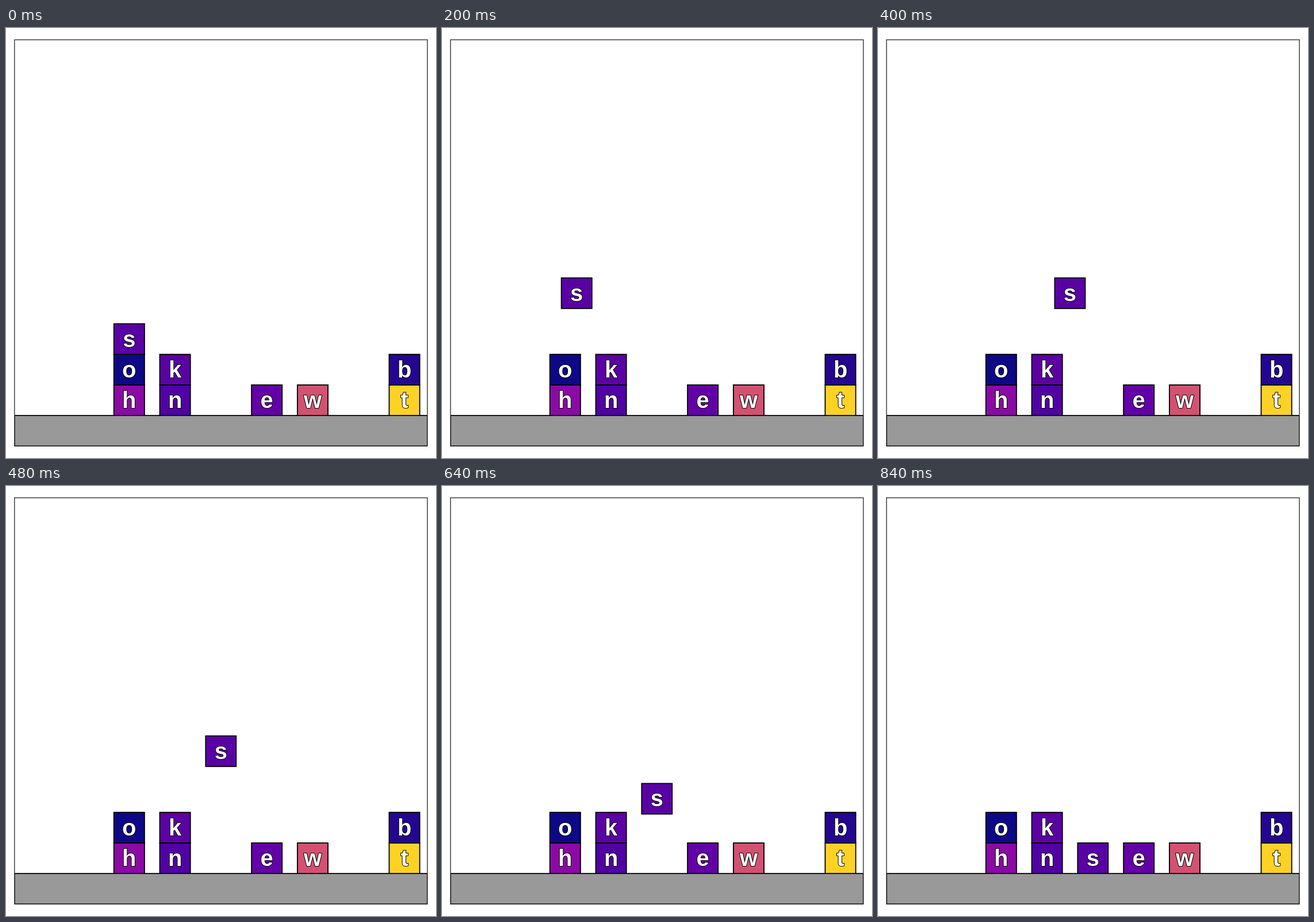
Write an HTML page that moves like this. It is 748 by 748 pixels and loops after 880 ms.

```html
<!DOCTYPE html>
<html lang="en">
<head>
<meta charset="utf-8">
<title>Stacking blocks</title>
<style>
  html, body { margin: 0; width: 100%; height: 100%; overflow: hidden; background: #fff; }
  svg { display: block; width: 748px; height: 748px; }
  .solid { stroke: #000; stroke-width: 1.8; }
  .frame { fill: none; stroke: #333; stroke-width: 1.4; }
  text {
    font: bold 40px "Liberation Sans", Arial, sans-serif;
    text-anchor: middle;
    fill: #fff;
    stroke: #000;
    stroke-width: 2;
    stroke-linejoin: round;
    paint-order: stroke;
  }
  .mover { animation: carry 880ms infinite; }
  /* lift, carry across, lower, rest: one step every 40 ms */
  @keyframes carry {
    0% { transform: translate(0, 0); animation-timing-function: steps(4); }
    18.1818% { transform: translate(0, -79.8px); animation-timing-function: steps(8); }
    54.5454% { transform: translate(159.6px, -79.8px); animation-timing-function: steps(9); }
    95.4545%, 100% { transform: translate(159.6px, 106.4px); }
  }
</style>
</head>
<body>
<svg viewBox="0 0 748 748">
  <clipPath id="view"><rect x="14.8" y="20.5" width="718.2" height="706.8"/></clipPath>
  <g clip-path="url(#view)">
    <rect class="solid" x="14.8" y="674.1" width="718.2" height="53.2" fill="#999"/>
    <g id="blocks"></g>
  </g>
  <rect class="frame" x="14.8" y="20.5" width="718.2" height="706.8"/>
</svg>
<script>
  const SIZE = 53.2, PITCH = 79.8, LEFT = 28.1, FLOOR = 674.1;

  // letter, column, row above the floor, colour
  const blocks = [
    ['h', 2, 0, '#8b0aa5'],
    ['o', 2, 1, '#0d0887'],
    ['n', 3, 0, '#5002a2'],
    ['k', 3, 1, '#5b02a3'],
    ['e', 5, 0, '#6400a7'],
    ['w', 6, 0, '#d35171'],
    ['t', 8, 0, '#fcd225'],
    ['b', 8, 1, '#240691'],
    ['s', 2, 2, '#5901a5', 'mover'],
  ];

  function drawBlock([letter, col, row, color, name = '']) {
    const x = LEFT + col * PITCH;
    const y = FLOOR - (row + 1) * SIZE;
    return `<g class="${name}">
      <rect class="solid" x="${x}" y="${y}" width="${SIZE}" height="${SIZE}" fill="${color}"/>
      <text x="${x + SIZE / 2}" y="${y + 40}">${letter}</text>
    </g>`;
  }

  document.getElementById('blocks').innerHTML = blocks.map(drawBlock).join('');
</script>
</body>
</html>
```
